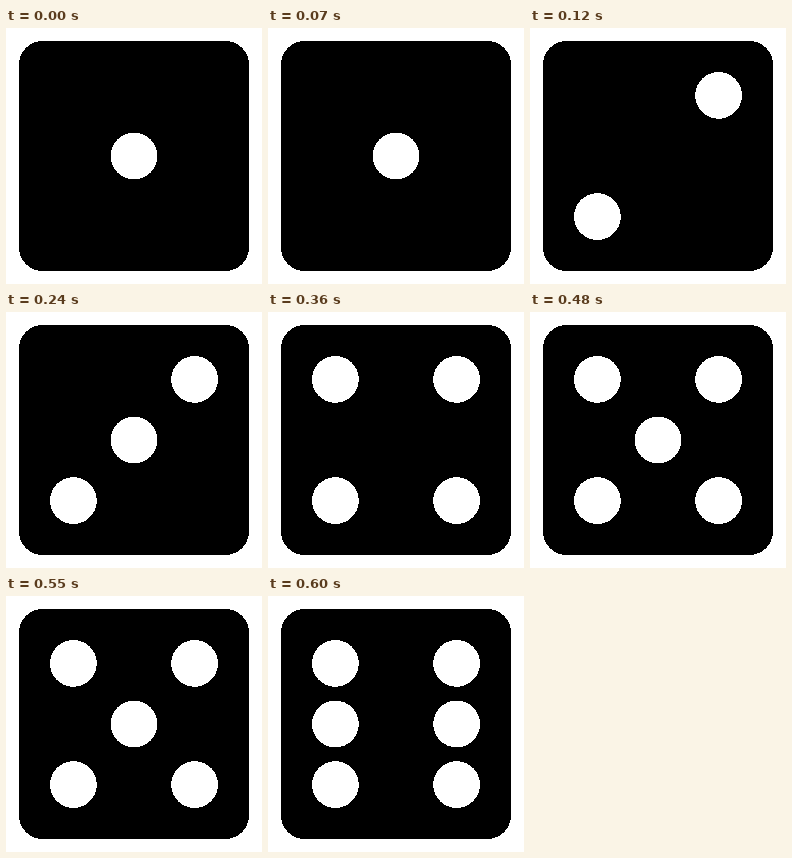
Write an HTML page that moves like this. It is 256 by 256 pixels and loops after 720 ms.

```html
<!DOCTYPE html>
<html lang="en">
<head>
<meta charset="utf-8">
<title>Die</title>
<style>
  html, body { margin: 0; width: 100%; height: 100%; overflow: hidden; background: #fff; }
  svg { display: block; width: 100%; height: 100%; shape-rendering: crispEdges; }
  .pips { fill: #fff; animation: 720ms step-end infinite; }
  .odd { animation-name: odd; animation-duration: 240ms; }
  .rising { animation-name: from-two; }
  .falling { animation-name: from-four; }
  .sides { animation-name: six; }
  @keyframes odd { 0% { visibility: visible } 50%, 100% { visibility: hidden } }
  @keyframes from-two { 0% { visibility: hidden } 16.666%, 100% { visibility: visible } }
  @keyframes from-four { 0% { visibility: hidden } 50%, 100% { visibility: visible } }
  @keyframes six { 0% { visibility: hidden } 83.333%, 100% { visibility: visible } }
</style>
</head>
<body>
<svg viewBox="0 0 256 256">
  <rect x="13" y="13" width="230" height="230" rx="23.5"/>
  <g class="pips odd">
    <circle cx="128" cy="128" r="23.4"/>
  </g>
  <g class="pips rising">
    <circle cx="188.6" cy="67.4" r="23.4"/>
    <circle cx="67.4" cy="188.6" r="23.4"/>
  </g>
  <g class="pips falling">
    <circle cx="67.4" cy="67.4" r="23.4"/>
    <circle cx="188.6" cy="188.6" r="23.4"/>
  </g>
  <g class="pips sides">
    <circle cx="67.4" cy="128" r="23.4"/>
    <circle cx="188.6" cy="128" r="23.4"/>
  </g>
</svg>
</body>
</html>
```
